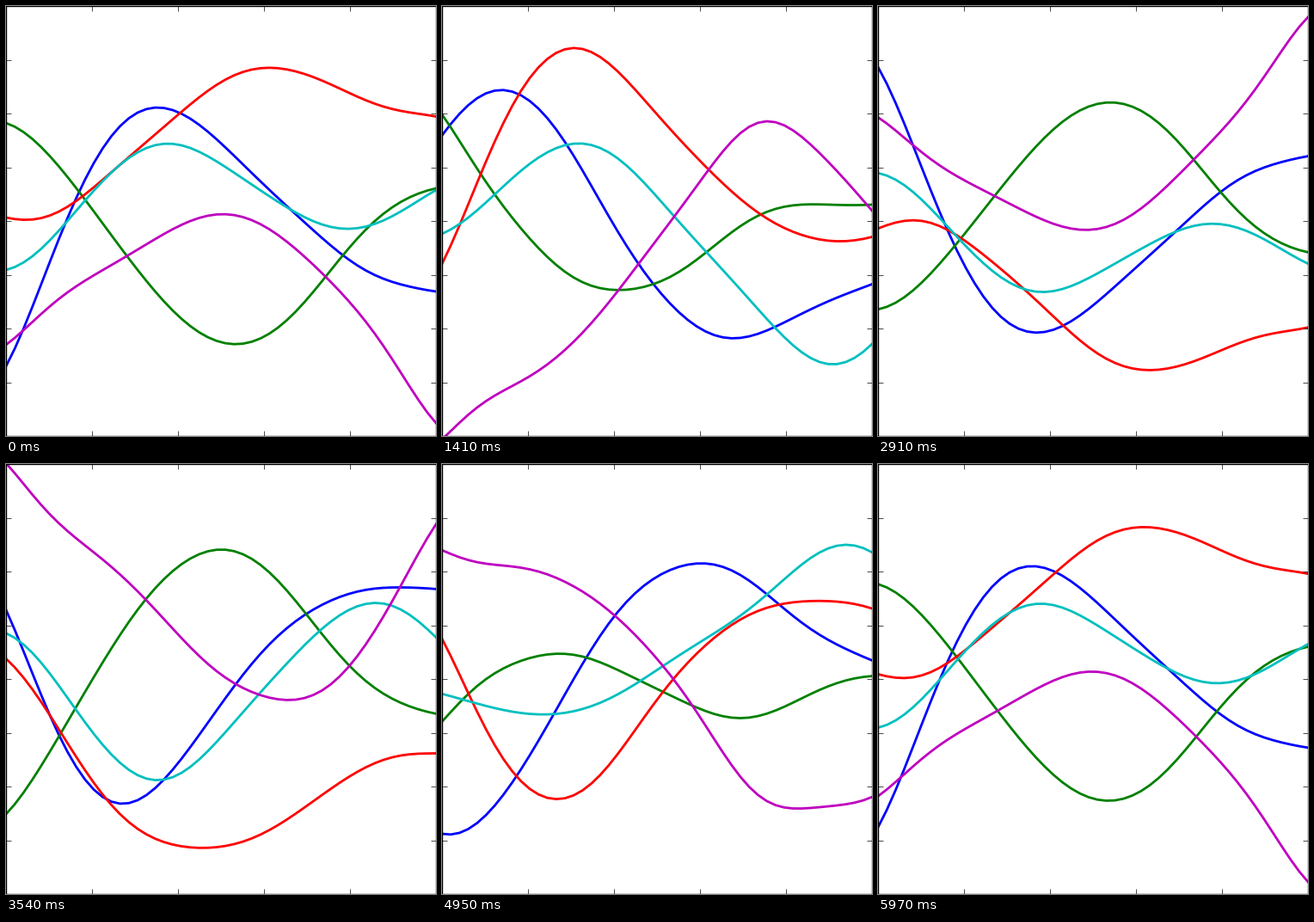
These frames come from a looping animation (500x500 px, 6000 ms). A matplotlib script:

```python
import numpy as np
import matplotlib.pyplot as plt
from matplotlib.animation import FuncAnimation

plt.style.use("classic")

FRAMES, INTERVAL = 200, 30
UNIT = 62.5  # pixels per y unit
GAP = 2 * np.pi * 47 / FRAMES  # phase between the two poses

# Heights in pixels above the middle, at x = 0, 0.5, ... 5, in two poses.
START = {
    "b": [-169, -50, 63.5, 124.5, 126.5, 90.5, 42, -4, -46, -71, -82],
    "g": [114, 76.5, 14, -53, -110, -141, -134.5, -91, -30, 16.5, 38],
    "r": [4, 6, 37.5, 80.5, 123.5, 161.5, 178, 170, 148.5, 130, 121.5],
    "c": [-57, -23.5, 33, 78, 89, 66, 33, 3, -9, 6, 36],
    "m": [-144, -100, -64.5, -35, -6.5, 8, -6, -44, -95, -162, -235],
}
LATER = {
    "b": [99.5, 148, 141, 81, -5, -78.5, -125, -135.5, -117, -93, -73.5],
    "g": [124, 47, -18, -64, -80, -72, -42, -4, 17, 19, 19],
    "r": [-50, 66.5, 163.5, 201, 178, 124, 70, 23, -9, -23, -18.5],
    "c": [-15, 20.5, 65, 89.5, 76, 28, -28, -83, -137, -166.5, -143],
    "m": [-254, -210, -182, -143, -87.5, -21, 45.5, 105, 110, 68, 12],
}

knots = np.linspace(0, 5, 11)
x = np.linspace(0, 5, 50)


def kernel(a, b, scale=0.8):
    return np.exp(-0.5 * ((a[:, None] - b[None, :]) / scale) ** 2)


# Gaussian process mean: a smooth curve through the knots.
weights = kernel(x, knots) @ np.linalg.inv(
    kernel(knots, knots) + 1e-4 * np.eye(len(knots)))


def smooth(heights):
    return weights @ np.array(heights) / UNIT


poses = {c: (smooth(START[c]), smooth(LATER[c])) for c in START}

fig = plt.figure(figsize=(5, 5), dpi=100)
ax = fig.add_axes([0, 0, 1, 1])
ax.set_xlim(0, 5)
ax.set_ylim(-4, 4)
ax.set_xticks(range(6))
ax.set_yticks(range(-4, 5))
ax.tick_params(direction="in", length=4, width=0.5, top=True, right=True,
               labelbottom=False, labelleft=False)
lines = {c: ax.plot(x, poses[c][0], color=c, lw=2)[0] for c in poses}


def update(i):
    """Move every curve along the great circle through its two poses."""
    t = 2 * np.pi * i / FRAMES
    u, v = np.sin(GAP - t) / np.sin(GAP), np.sin(t) / np.sin(GAP)
    for c, (first, second) in poses.items():
        lines[c].set_ydata(u * first + v * second)
    return list(lines.values())


anim = FuncAnimation(fig, update, frames=FRAMES, interval=INTERVAL,
                     repeat=True, repeat_delay=0)
plt.show()
```
